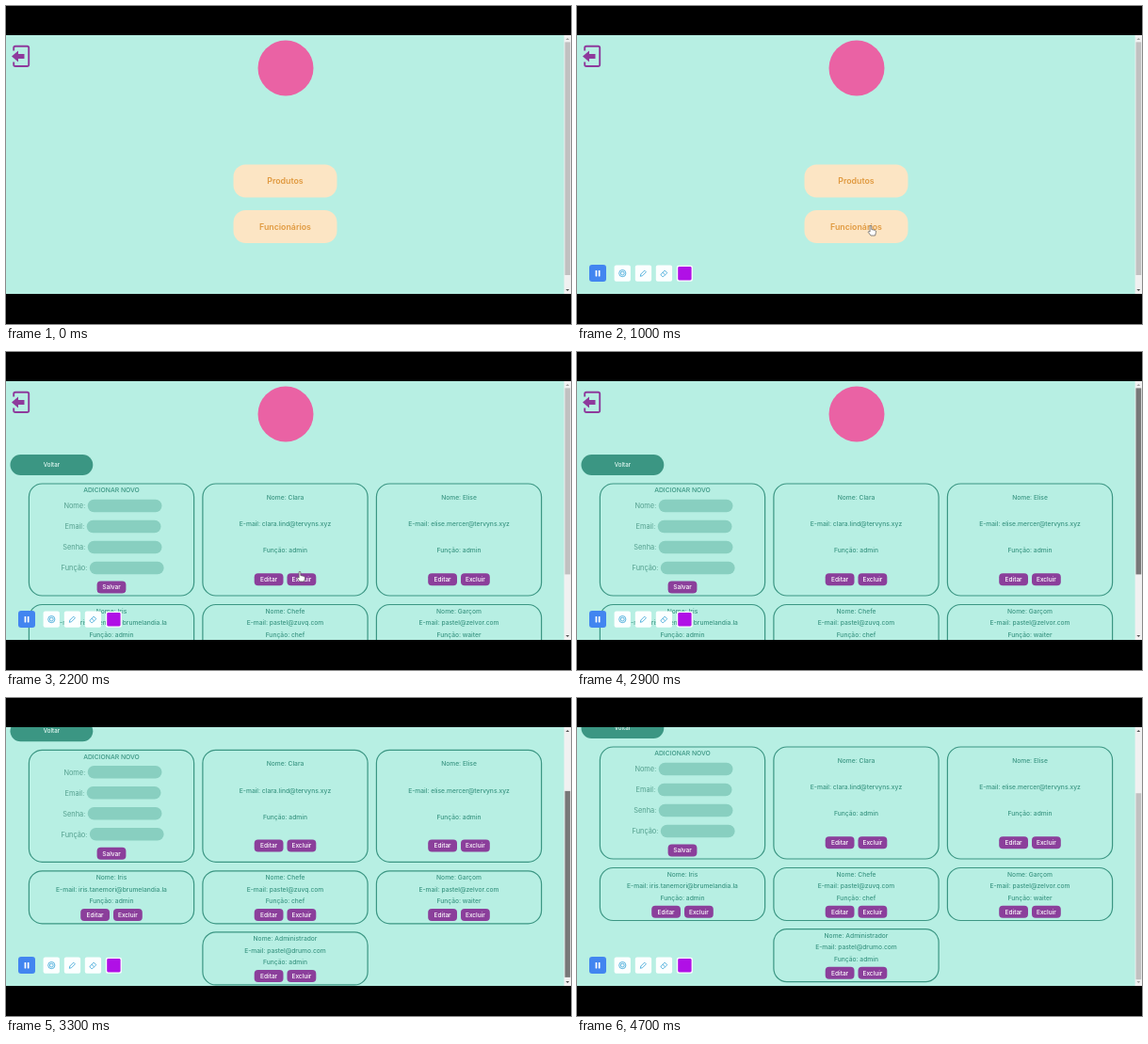
Animation, 600 px wide and 338 px high, one loop 5 s. Source, as an HTML page:

```html
<!DOCTYPE html>
<html lang="pt">
<head>
<meta charset="utf-8">
<title>Painel</title>
<style>
  html, body { margin: 0; width: 100%; height: 100%; overflow: hidden; background: #000; }
  svg { display: block; width: 100%; height: 100%; font-family: Inter, "Open Sans", sans-serif; }
</style>
</head>
<body>
<svg id="stage" viewBox="0 0 600 338"></svg>
<script>
const LOOP = 5000, STEP = 100;
const TEAL = '#3b9683', PURPLE = '#8b3f9b', MAX_SCROLL = 88;

const rect = (x, y, w, h, r, fill, extra = '') =>
  `<rect x="${x}" y="${y}" width="${w}" height="${h}" rx="${r}" fill="${fill}" ${extra}/>`;

// y is the middle of the capitals
const text = (s, x, y, size, fill, weight = 400, anchor = 'middle') =>
  `<text x="${x}" y="${y + size * 0.36}" font-size="${size}" fill="${fill}" font-weight="${weight}" text-anchor="${anchor}">${s}</text>`;

const group = (id, body, extra = '') => `<g id="${id}" ${extra}>${body}</g>`;

const frame = (cx, y, h) =>
  rect(cx - 87.6, y, 175.2, h, 14, 'none', `stroke="${TEAL}" stroke-width="1.2"`);

const pill = (label, cx, y) =>
  rect(cx - 15.4, y - 6.5, 30.8, 13, 4, PURPLE) + text(label, cx, y, 6.5, '#fff', 500);

const bigButton = (label, y) =>
  rect(241.5, y, 110, 35, 13, '#fce5c4') + text(label, 296.5, y + 17.5, 8.8, '#e09a40', 600);

const logo = cx => `<circle cx="${cx}" cy="66" r="29.5" fill="#ea62a4"/>`;

const exitIcon = `
  <path d="M8.2 47.5V44.6Q8.2 42.8 10 42.8H22.4Q24.2 42.8 24.2 44.6V62.2Q24.2 64 22.4 64H10Q8.2 64 8.2 62.2V59.5"
    fill="none" stroke="#8e3a9c" stroke-width="1.9"/>
  <path d="M6 53.5L13 47.5V51H19.5V56H13V59.5Z" fill="#8e3a9c"/>`;

const backButton = rect(4.5, 109, 87.8, 22, 11, TEAL) + text('Voltar', 48.4, 120, 6.1, '#e6fbf5', 500);

function form(cx) {
  const fields = [['Nome:', -25.3], ['Email:', -26.3], ['Senha:', -25.3], ['Função:', -23.2]];
  return frame(cx, 140, 119) + text('ADICIONAR NOVO', cx, 146.8, 6.8, TEAL, 500) +
    fields.map(([label, dx], i) => {
      const y = 163.6 + i * 22;
      return text(label, cx + dx - 2.4, y, 7.4, '#549f8e', 400, 'end') +
        rect(cx + dx, y - 6.8, 78.8, 13.4, 6.7, '#88cfc0');
    }).join('') + pill('Salvar', cx, 250);
}

function card(cx, y, h, lines, first, gap, buttons) {
  return frame(cx, y, h) +
    lines.map((s, i) => text(s, cx, first + i * gap, 6.7, TEAL, 450)).join('') +
    pill('Editar', cx - 17.4, buttons) + pill('Excluir', cx + 17.4, buttons);
}

const info = (name, mail, role) => ['Nome: ' + name, 'E-mail: ' + mail, 'Função: ' + role];
const tall = (cx, ...p) => card(cx, 140, 119, info(...p), 154.6, 28.2, 241.8);
const low = (cx, y, ...p) => card(cx, y, 56, info(...p), y + 7, 12.4, y + 46.7);

const COLS = [112, 296.5, 481];
const menu = exitIcon + logo(297) + bigButton('Produtos', 168.5) + bigButton('Funcionários', 217);
const empty = exitIcon + logo(300.5) + backButton + form(300);
const staff = exitIcon + logo(297) + backButton + form(COLS[0]) +
  tall(COLS[1], 'Clara', 'clara.lind@tervyns.xyz', 'admin') +
  tall(COLS[2], 'Elise', 'elise.mercer@tervyns.xyz', 'admin') +
  low(COLS[0], 268.5, 'Iris', 'iris.tanemori@brumelandia.la', 'admin') +
  low(COLS[1], 268.5, 'Chefe', 'pastel@zuvq.com', 'chef') +
  low(COLS[2], 268.5, 'Garçom', 'pastel@zelvor.com', 'waiter') +
  low(COLS[1], 333.6, 'Administrador', 'pastel@drumo.com', 'admin');

const scrollbar = rect(592.6, 31, 7.4, 275, 0, '#f1f1f1') +
  '<path id="up" d="M594.4 36L596.3 34L598.2 36Z"/>' +
  '<path id="down" d="M594.4 301L596.3 303L598.2 301Z"/>' +
  '<rect id="thumb" x="593.5" width="5.7"/>';

const toolbar = rect(13, 275, 18, 18, 3, '#4285f0') +
  rect(19.6, 281, 1.7, 6.4, 0.3, '#fff') + rect(22.8, 281, 1.7, 6.4, 0.3, '#fff') +
  [39.6, 61.8, 83.8].map(x => rect(x, 275.5, 17.3, 17.3, 2, '#fbffff')).join('') +
  `<g fill="none" stroke="#35a3d6" stroke-width="0.8" stroke-linejoin="round">
    <circle cx="48.3" cy="284.1" r="3.6"/><circle cx="48.3" cy="284.1" r="1.9"/>
    <path d="M67.3 287.3L67.8 285L71.7 281.1L73.4 282.8L69.5 286.7Z"/>
    <path d="M89.1 285.2L93.1 281.1L95.8 283.6L91.8 287.6H90.8L89.1 286ZM91 283.3L93.6 285.8"/>
  </g>` +
  rect(105.9, 275.8, 17, 17, 2, '#fbffff') + rect(107.2, 277.1, 14.4, 14.4, 1.4, '#b010e6');

const cursor = `
  <path id="hand" d="M-.9 .2Q0 -.8 .8 .2V4L4.6 4.9Q5.8 5.3 5.5 6.8L4.6 10.5H0L-2.8 6.8Q-2.7 5.4 -.9 6.5Z"/>
  <path id="arrow" d="M0 0V9L2.1 7.1L3.6 10.3L5 9.7L3.6 6.6H6.4Z"/>`;

document.getElementById('stage').innerHTML =
  '<clipPath id="view"><rect y="31" width="600" height="275"/></clipPath>' +
  rect(0, 0, 600, 338, 0, '#000') +
  group('screen',
    rect(0, 31, 600, 275, 0, '#b7efe3') +
    group('menu', menu) + group('empty', empty) + group('staff', staff) +
    group('bar', scrollbar) + group('tools', toolbar) +
    group('cursor', cursor, 'fill="#fff" stroke="#555" stroke-width="0.7" stroke-linejoin="round"'),
    'clip-path="url(#view)"');

const $ = id => document.getElementById(id);
const show = (id, on) => $(id).setAttribute('display', on ? 'inline' : 'none');
const clamp = v => Math.min(1, Math.max(0, v));
const easeOut = (k, p) => 1 - Math.pow(1 - clamp(k), p);
const mix = (a, b, k) => a + (b - a) * k;

function thumbColor(t) {
  if (t >= 2900 && t < 4300) return '#787878';
  return t >= 2700 && t < 4500 ? '#a8a8a8' : '#c1c1c1';
}

function draw(time) {
  const t = Math.floor(time / STEP) * STEP;
  const onMenu = t < 1800, onStaff = t >= 2200;
  show('menu', onMenu);
  show('empty', !onMenu && !onStaff);
  show('staff', onStaff);
  show('bar', onMenu || onStaff);
  show('tools', t >= 100);

  const scroll = MAX_SCROLL * easeOut((t - 2900) / 500, 2.04);
  $('staff').setAttribute('transform', `translate(0 ${-scroll})`);
  const thumb = $('thumb');
  thumb.setAttribute('y', 38.4 + scroll * 0.714);
  thumb.setAttribute('height', onMenu ? 247.6 : 198);
  thumb.setAttribute('fill', thumbColor(t));
  $('up').setAttribute('fill', scroll > 0 ? '#505050' : '#a3a3a3');
  $('down').setAttribute('fill', scroll < MAX_SCROLL ? '#505050' : '#a3a3a3');

  // enters from the lower right, later leaves for the scrollbar
  const enter = easeOut((t - 600) / 400, 2);
  const leave = easeOut((t - 2300) / 400, 1.6);
  const x = mix(mix(430, 312, enter), 600, leave);
  const y = mix(mix(296, 233.5, enter), 190, leave);
  const over = t >= 900 && t < 2400;
  show('cursor', t >= 700 && t < 2700);
  show('hand', over);
  show('arrow', !over);
  $('cursor').setAttribute('transform', `translate(${x} ${y})`);
}

const start = performance.now();
function tick() {
  draw((performance.now() - start) % LOOP);
  requestAnimationFrame(tick);
}
tick();
</script>
</body>
</html>
```
